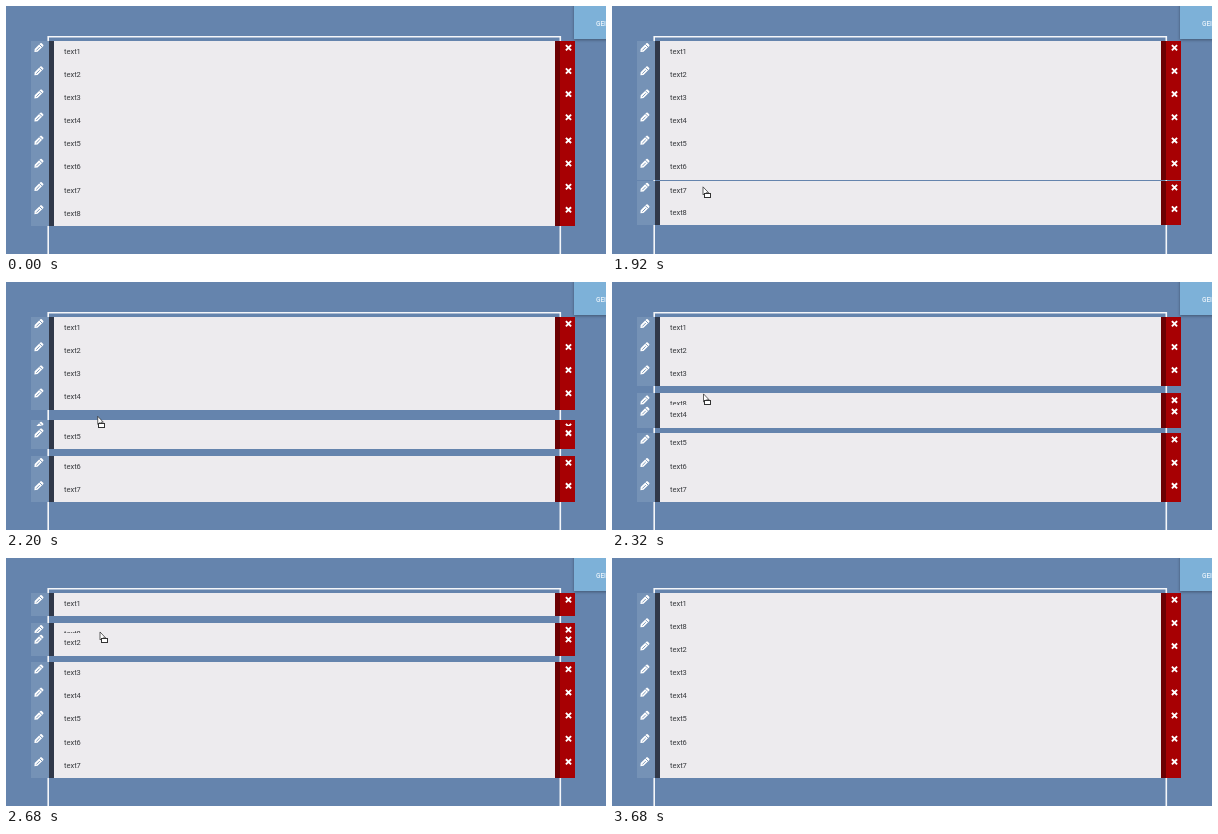
Write an HTML page that moves like this. It is 600 by 248 pixels and loops after 3.72 s.

```html
<!DOCTYPE html>
<html lang="en">
<head>
<meta charset="utf-8">
<title>Sortable list</title>
<style>
  html, body { margin: 0; width: 100%; height: 100%; overflow: hidden; background: #6584ad; }
  svg { display: block; }
  text { font: 7.5px Roboto, sans-serif; fill: #37393d; }
  rect { shape-rendering: crispEdges; }
  .button { fill: #7db1d8; filter: drop-shadow(0 1px 1.5px rgba(0, 0, 0, .35)); }
  .button-label { font-size: 6.5px; font-weight: 500; fill: #eaf3fa; }
</style>
</head>
<body>
<svg width="600" height="248" viewBox="0 0 600 248">
  <defs>
    <g id="row">
      <rect x="25" width="18" height="23.15" fill="#7592b6"/>
      <rect x="43" width="5" height="23.15" fill="#303849"/>
      <rect x="48" width="501" height="23.15" fill="#edebee"/>
      <rect x="549" width="5" height="23.15" fill="#6c0003"/>
      <rect x="554" width="15" height="23.15" fill="#a70003"/>
      <g transform="translate(32.5 7) rotate(-45)">
        <path d="M-5.8 0L-3.4 -2H4.6Q5.6 -2 5.6 -1V1Q5.6 2 4.6 2H-3.4Z" fill="#fff"/>
        <path d="M-3.3 .2H1.6M3.2 -2V2" stroke="#7592b6" stroke-width=".9"/>
      </g>
      <path d="M559.9 4.2l5.2 5.2m0 -5.2l-5.2 5.2" stroke="#fff" stroke-width="1.9"/>
    </g>
  </defs>
  <path d="M42.2 248V30.7H554.3V248" fill="none" stroke="#f4f6f9" stroke-width="1.6"/>
  <g id="list"></g>
  <rect class="button" x="568" y="-4" width="40" height="36.5"/>
  <text class="button-label" x="590" y="20.4">GEI</text>
  <g id="cursor">
    <path d="M0 0V8L1.8 6.4L3.1 9.2L4.4 8.6L3.1 5.9H5.6Z" fill="#fff" stroke="#222" stroke-width=".7"/>
    <rect id="badge" x="1" y="7" width="6" height="4" fill="#fff" stroke="#333" stroke-width="1"/>
  </g>
</svg>
<script>
const LOOP = 3720, TOP = 35, PITCH = 23.15, SWAP_MS = 170;
const DRAG_START = 1800, DROP = 2800, HIDE = 2880;
// Start of each swap as the last row is dragged upwards.
const swaps = [1902, 1993, 2090, 2201, 2420, 2571];
// Pointer path: time, x, y
const path = [
  [240, 71, 250], [560, 76, 212], [1040, 78, 205], [1680, 80, 206], [1800, 86, 197],
  [1920, 91, 181], [2080, 92, 157], [2320, 91.5, 112], [2680, 94, 74], [2800, 94, 72], [2880, 94, 72]
];

const byId = id => document.getElementById(id);
const mix = (a, b, p) => a + (b - a) * p;
const clamp = x => Math.min(1, Math.max(0, x));
const smooth = x => x * x * (3 - 2 * x);
const swapProgress = (k, t) => smooth(clamp((t - swaps[k]) / SWAP_MS));

// Each swap picks up the dragged row wherever the previous one left it.
function draggedSlot(t, k = swaps.length - 1) {
  if (k < 0) return 7;
  if (t < swaps[k]) return draggedSlot(t, k - 1);
  return mix(draggedSlot(swaps[k], k - 1), 6 - k, swapProgress(k, t));
}

function slot(i, t) {
  if (i === 7) return draggedSlot(t);
  return i ? i + swapProgress(6 - i, t) : 0;
}

function pointer(t) {
  const next = Math.max(1, path.findIndex(p => p[0] > t));
  const [a, b] = [path[next - 1], path[next]];
  const p = clamp((t - a[0]) / (b[0] - a[0]));
  return [mix(a[1], b[1], p), mix(a[2], b[2], p)];
}

// The dragged row comes first so that it passes beneath the others.
const order = [7, 0, 1, 2, 3, 4, 5, 6];
byId('list').innerHTML = order.map(i =>
  `<g><use href="#row"/><text x="58" y="12.7">text${i + 1}</text></g>`).join('');
const rows = [...byId('list').children];

function draw(now) {
  const t = now % LOOP;
  rows.forEach((row, n) =>
    row.setAttribute('transform', `translate(0 ${TOP + PITCH * slot(order[n], t)})`));
  const visible = t >= path[0][0] && t < HIDE;
  byId('cursor').style.display = visible ? '' : 'none';
  if (visible) byId('cursor').setAttribute('transform', `translate(${pointer(t)})`);
  byId('badge').style.display = t >= DRAG_START && t < DROP ? '' : 'none';
}

const start = performance.now();
function frame() {
  draw(performance.now() - start);
  requestAnimationFrame(frame);
}
frame();
</script>
</body>
</html>
```
